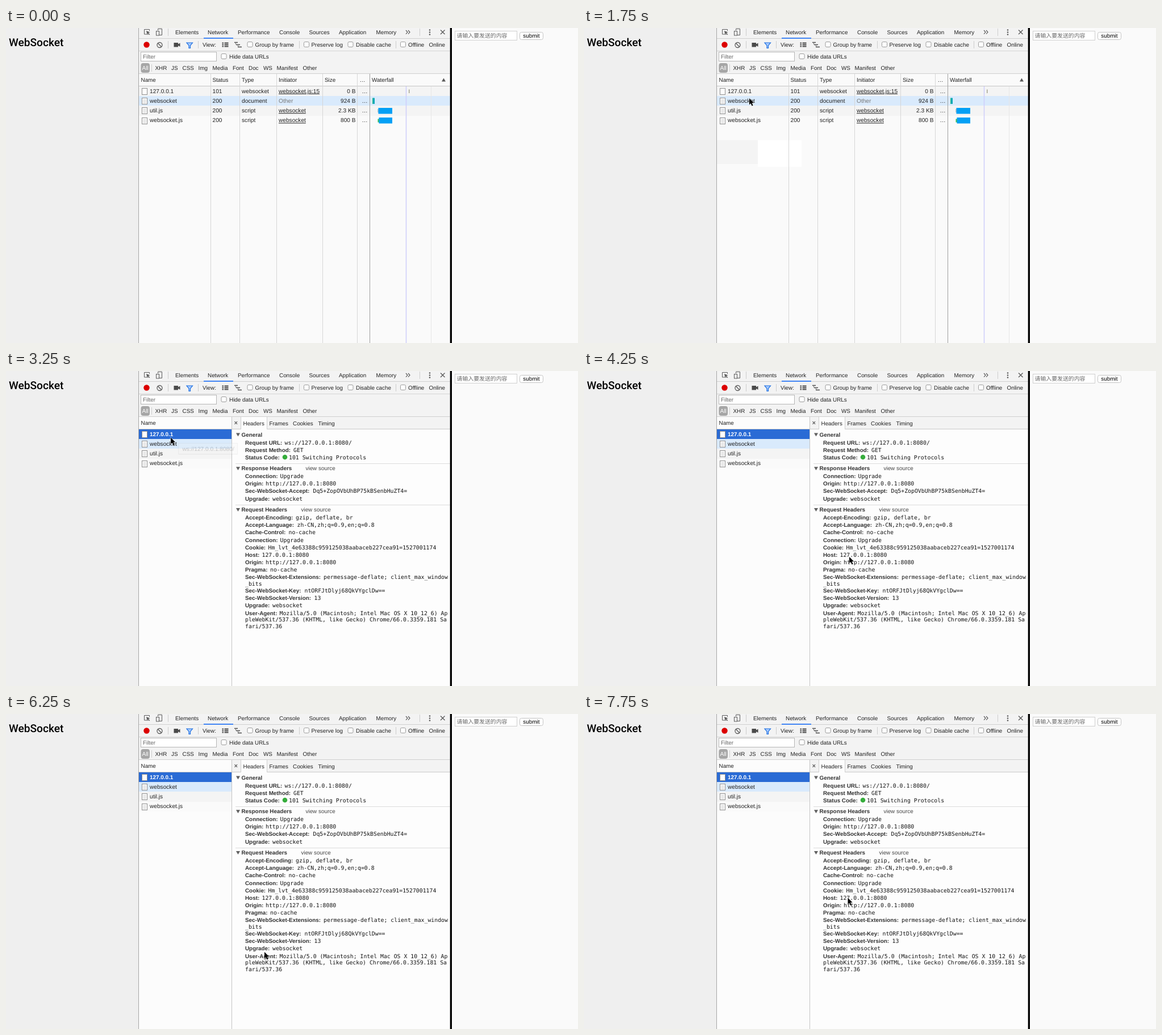
These frames come from a looping animation (1007 by 556 pixels, 8 s). An HTML page:

```html
<!DOCTYPE html>
<html lang="en">
<head>
<meta charset="utf-8">
<title>WebSocket network panel</title>
<style>
html, body { margin: 0; width: 100%; height: 100%; overflow: hidden; background: #fafafa; }
svg { position: absolute; left: 0; top: 0; display: block; }
text { font: 10px "Liberation Sans", Arial, sans-serif; fill: #222; white-space: pre; text-rendering: geometricPrecision; }
.bar { font-size: 9.9px; }
.cell { font-size: 10.15px; }
.bold { font-size: 9.87px; font-weight: bold; fill: #333; }
.mono { font: 9.83px "DejaVu Sans Mono", monospace; fill: #141414; }
.cjk { font: 9.9px "Noto Sans CJK SC", "Noto Sans CJK", sans-serif; fill: #686868; }
.title { font: 500 19.1px Roboto, "Liberation Sans", sans-serif; fill: #000; }
.link { text-decoration: underline; }
.end { text-anchor: end; }
</style>
</head>
<body>
<svg id="stage" width="1007" height="556" viewBox="0 0 1007 556"></svg>
<script>
const LOOP = 8000;
const ROW_TOP = 103, ROW_H = 17.2;

const esc = s => s.replace(/&/g, '&amp;').replace(/</g, '&lt;');
const text = (x, y, s, cls = 'bar', extra = '') => `<text x="${x}" y="${y}" class="${cls}" ${extra}>${esc(s)}</text>`;
const rect = (x, y, w, h, fill, extra = '') => `<rect x="${x}" y="${y}" width="${w}" height="${h}" fill="${fill}" ${extra}/>`;
const path = (d, stroke, extra = '') => `<path d="${d}" fill="none" stroke="${stroke}" ${extra}/>`;
const vline = (x, y1, y2, color) => path(`M${x} ${y1}V${y2}`, color);
const hline = (y, x1, x2, color) => path(`M${x1} ${y}H${x2}`, color);
const group = (id, body) => `<g id="${id}">${body}</g>`;
const rowY = i => Math.round(ROW_TOP + i * ROW_H);
const baseY = i => 114.8 + i * ROW_H;
const checkbox = (x, y) => rect(x, y, 9, 9, '#fff', 'rx="2" stroke="#9b9b9b"');
const labels = (list, y) => list.map(([x, s]) => text(x, y, s)).join('');

function fileIcon(i, lined) {
  const y = rowY(i) + 3;
  return rect(239.5, y + .5, 9, 11, '#fff', 'stroke="#8f8f8f"') +
    (lined ? path(`M241.5 ${y + 3.5}h5m-5 2h5m-5 2h5m-5 2h5`, '#d3d3d3') : '');
}

function page() {
  return rect(0, 0, 234, 556, '#efefef') + text(5, 32, 'WebSocket', 'title') +
    rect(785, 0, 222, 556, '#fafafa') +
    rect(790.5, 5.5, 109, 16, '#fff', 'stroke="#d0d0d0"') +
    text(793.5, 17.3, '请输入要发送的内容', 'cjk') +
    rect(904.5, 7.5, 41, 13, '#fff', 'rx="3" stroke="#c4c4c4"') +
    text(910.3, 17.3, 'submit', 'bar', 'style="fill:#000"');
}

function toolbars() {
  const tabs = [[298, 'Elements'], [355, 'Network'], [408, 'Performance'], [481, 'Console'],
    [533.5, 'Sources'], [586, 'Application'], [651.5, 'Memory']];
  const types = [[262.5, 'XHR'], [291, 'JS'], [310.5, 'CSS'], [338.5, 'Img'], [363.5, 'Media'], [399, 'Font'],
    [427, 'Doc'], [453, 'WS'], [476.5, 'Manifest'], [522.5, 'Other']];
  const ink = '#5a5a5a';
  return rect(234, 0, 548, 81, '#f3f3f3') +
    hline(18.5, 234, 782, '#cfcfcf') + hline(40.5, 234, 782, '#d4d4d4') +
    // element picker and device icons
    path('M251 11H243.5V2.5H252.5V5', ink) +
    `<path d="M247 5l6.5 2.5-2.6 1 2.4 3-1 .8-2.4-3-1.4 2z" fill="${ink}"/>` +
    path('M267.5 4V1.5H274.5V12.5H270', ink) + rect(264.5, 5.5, 5, 7.5, '#f3f3f3', `stroke="${ink}"`) +
    vline(285.5, 1, 14, '#cdcdcd') + labels(tabs, 11) +
    rect(348, 17, 52, 2, '#4285f4') +
    path('M704 4l3 3.3-3 3.3M708 4l3 3.3-3 3.3', ink, 'stroke-width="1.2"') +
    vline(728.5, 1, 14, '#cdcdcd') +
    [3.5, 7.5, 11.5].map(y => `<circle cx="746" cy="${y}" r="1.3" fill="${ink}"/>`).join('') +
    path('M765 3.5l7.5 7.5m0-7.5l-7.5 7.5', ink, 'stroke-width="1.4"') +
    // record, clear, camera, filter, view modes
    '<circle cx="247.5" cy="29.5" r="5.2" fill="#dc0000"/>' +
    `<circle cx="270.5" cy="30" r="4.5" fill="none" stroke="${ink}" stroke-width="1.3"/>` +
    path('M267.3 26.8l6.4 6.4', ink, 'stroke-width="1.3"') +
    vline(285.5, 23, 36, '#cdcdcd') +
    '<path d="M295.5 26h7.5v2.5l3.5-2v6.5l-3.5-2v2.5h-7.5z" fill="#4a4a4a"/>' +
    '<path d="M318 26h10.5l-4 5v4.5h-2.5v-4.5z" fill="#a9ccff" stroke="#1a6ce0" stroke-width="1.2"/>' +
    vline(338.5, 23, 36, '#cdcdcd') + text(346, 33, 'View:') +
    path('M380.5 26.5h2.5m1.5 0h7m-11 3h2.5m1.5 0h7m-11 3h2.5m1.5 0h7', '#4a4a4a', 'stroke-width="1.8"') +
    path('M402 25.5h6m-3 4h7m-4 4h7', '#4a4a4a', 'stroke-width="1.5"') + path('M404.5 25v4m4 0v4', '#777') +
    [[425, 24.5], [524.5, 24.5], [602, 24.5], [694.5, 24.5], [379, 45.5]].map(p => checkbox(...p)).join('') +
    labels([[438.5, 'Group by frame'], [537.5, 'Preserve log'], [616, 'Disable cache'], [708, 'Offline'], [744.5, 'Online']], 33) +
    vline(516.5, 23, 36, '#cdcdcd') + vline(686.5, 23, 36, '#cdcdcd') +
    rect(237.5, 42.5, 133, 16, '#fff', 'stroke="#b5b5b5"') +
    text(241, 54, 'Filter', 'bar', 'style="fill:#666"') + text(393, 54, 'Hide data URLs') +
    rect(237.5, 62, 15.5, 17, '#a6a6a6', 'rx="4"') + text(239.5, 74, 'All', 'cell', 'style="fill:#fff"') +
    vline(256.5, 64, 77, '#cdcdcd') + labels(types, 74);
}

const FILES = [
  ['127.0.0.1', '101', 'websocket', 'websocket.js:15', '0 B'],
  ['websocket', '200', 'document', 'Other', '924 B'],
  ['util.js', '200', 'script', 'websocket', '2.3 KB'],
  ['websocket.js', '200', 'script', 'websocket', '800 B']
];
const SHADES = ['#f4f4f4', '#d9eafc', '#f4f4f4', '#fafafa'];

const band = (i, width, fill, extra) => rect(234, rowY(i), width, rowY(i + 1) - rowY(i), fill, extra);
const rowBands = width => SHADES.map((c, i) => band(i, width, c)).join('');

function tableView() {
  const heads = [[237.5, 'Name'], [363.5, 'Status'], [415, 'Type'], [480, 'Initiator'], [561, 'Size'], [622.5, '…'], [644, 'Waterfall']];
  const rows = FILES.map(([name, status, type, from, size], i) => {
    const y = baseY(i), other = from === 'Other';
    return fileIcon(i, i > 0) + text(253, y, name, 'cell') + text(363.5, y, status, 'cell') +
      text(415, y, type, 'cell') + text(480, y, from, other ? 'cell' : 'cell link', other ? 'style="fill:#777"' : '') +
      text(615.5, y, size, 'cell end') + text(626.5, y, '…', 'cell');
  }).join('');
  return rect(234, 81, 548, 475, '#fafafa') + rowBands(548) +
    group('residue', rect(234, 172, 146, 68, '#f4f4f4') + rect(306, 180, 77, 65, '#fff')) +
    group('cleared', rect(234, 172, 548, 26, '#fafafa')) +
    band(0, 548, '#eaf2fb', 'id="hover"') +
    hline(80.5, 234, 782, '#cfcfcf') + rect(234, 81, 548, 21, '#fafafa') + hline(102.5, 234, 782, '#c6c6c6') +
    [360.5, 411.5, 476.5, 557.5, 618.5].map(x => vline(x, 81, 556, '#d6d6d6')).join('') +
    vline(748.5, 103, 556, '#e6e6e6') + vline(640.5, 81, 556, '#a0a0a0') +
    rect(703.7, 103, 1.6, 453, '#cfcffb') +
    labels(heads, 95) + '<path d="M767 94.5l3.5-6 3.5 6z" fill="#5a5a5a"/>' + rows +
    rect(709, 108.5, 1.5, 6.5, '#a5a58f') +
    rect(645, 123.5, 1.5, 10.5, '#35c08a') + rect(646, 123.5, 3, 10.5, '#00a8b8') +
    rect(654, 143, 2, 6, '#c8c8c8') + rect(655.5, 141, 24.5, 10.5, '#03a0f5') +
    rect(654.5, 160.5, 3, 6, '#3cc05c') + rect(656.5, 158, 23.5, 10.5, '#03a0f5');
}

// label, value x, value (an extra string is a wrapped line)
const SECTIONS = [
  { y: 115.5, title: 'General', first: 129.6, lines: [
    ['Request URL:', 490.5, 'ws://127.0.0.1:8080/'],
    ['Request Method:', 506, 'GET'],
    ['Status Code:', 498, '101 Switching Protocols']] },
  { y: 175.3, title: 'Response Headers', source: 527.5, first: 189.2, lines: [
    ['Connection:', 482.5, 'Upgrade'],
    ['Origin:', 457, 'http://127.0.0.1:8080'],
    ['Sec-WebSocket-Accept:', 540.5, 'Dq5+ZopOVbUhBP75kBSenbHuZT4='],
    ['Upgrade:', 469, 'websocket']] },
  { y: 248, title: 'Request Headers', source: 519.5, first: 262.2, lines: [
    ['Accept-Encoding:', 510, 'gzip, deflate, br'],
    ['Accept-Language:', 512.5, 'zh-CN,zh;q=0.9,en;q=0.8'],
    ['Cache-Control:', 497.5, 'no-cache'],
    ['Connection:', 482.5, 'Upgrade'],
    ['Cookie:', 461.5, 'Hm_lvt_4e63388c959125038aabaceb227cea91=1527001174'],
    ['Host:', 450.5, '127.0.0.1:8080'],
    ['Origin:', 457, 'http://127.0.0.1:8080'],
    ['Pragma:', 465, 'no-cache'],
    ['Sec-WebSocket-Extensions:', 559, 'permessage-deflate; client_max_window', '_bits'],
    ['Sec-WebSocket-Key:', 525.5, 'ntORFJtDlyj68QkVYgclDw=='],
    ['Sec-WebSocket-Version:', 542.5, '13'],
    ['Upgrade:', 469, 'websocket'],
    ['User-Agent:', 481.5, 'Mozilla/5.0 (Macintosh; Intel Mac OS X 10_12_6) Ap',
      'pleWebKit/537.36 (KHTML, like Gecko) Chrome/66.0.3359.181 Sa', 'fari/537.36']] }
];

function section({ y, title, source, first, lines }) {
  let out = `<path d="M405 ${y - 6}h7l-3.5 6z" fill="#5f5f5f"/>` + text(414.5, y, title, 'bold');
  if (source) out += text(source, y, 'view source', 'bar', 'style="fill:#444"') + hline(Math.round(y - 12) + .5, 404, 782, '#dcdcdc');
  let at = first;
  for (const [label, x, value, ...wraps] of lines) {
    out += text(421, at, label, 'bold') + text(x, at, value, 'mono');
    for (const w of wraps) out += text(421, at += 11.9, w, 'mono');
    at += wraps.length ? 12.3 : 13.1;
  }
  return out;
}

function detailView() {
  const names = FILES.map(([name], i) => fileIcon(i, i > 0) +
    (i ? text(253, baseY(i), name, 'cell') : text(253, baseY(i), name, 'bold', 'style="fill:#fff"'))).join('');
  return rect(234, 81, 164, 475, '#fcfcfc') + rect(398, 81, 384, 475, '#fdfdfd') + rowBands(164) +
    band(0, 164, '#2a6bd5') + names +
    rect(398, 81, 384, 21, '#f3f3f3') + rect(413, 81, 46, 22, '#fdfdfd') +
    hline(80.5, 234, 782, '#cfcfcf') + hline(102.5, 234, 413, '#cacaca') + hline(102.5, 459, 782, '#cacaca') +
    vline(413.5, 81, 103, '#cfcfcf') + vline(459.5, 81, 103, '#cfcfcf') + vline(397.5, 81, 556, '#c4c4c4') +
    path('M402.5 89.2l4.6 4.6m0-4.6l-4.6 4.6', '#555', 'stroke-width="1.2"') +
    text(237.5, 95, 'Name') + labels([[417.5, 'Headers'], [463.5, 'Frames'], [505, 'Cookies'], [549.5, 'Timing']], 96) +
    SECTIONS.map(section).join('') +
    '<circle cx="491" cy="152" r="4.3" fill="#36ad3c"/>';
}

const tooltip = rect(304, 128, 104, 20, '#000', 'opacity=".12" rx="1"') +
  rect(303.5, 127.5, 104, 19, '#f3f3f3', 'stroke="#c8c8c8"') +
  text(310.5, 141, 'ws://127.0.0.1:8080/', 'cell');

const cursor = '<path d="M0 0V11.4L2.6 9 4.6 13.6 6.6 12.7 4.6 8.3H8.2Z" fill="#000" stroke="#fff" stroke-width=".9" paint-order="stroke"/>';

document.getElementById('stage').innerHTML = page() + toolbars() +
  group('table', tableView()) + group('detail', detailView()) +
  vline(233.5, 0, 556, '#a6a6a6') + rect(781.7, 0, 3.3, 556, '#000') +
  group('tip', tooltip) + group('cursor', cursor);

// time, x, y of the pointer
const POINTER = [
  [250, 3, 132], [500, 240, 195], [750, 372, 229], [1250, 309, 182.5], [1500, 296, 142], [1750, 291, 124], [2000, 290, 117.5],
  [3500, 310, 143], [3750, 365, 210], [4000, 430, 285], [4250, 467, 328], [4500, 458, 355], [4750, 447, 385],
  [5000, 439, 412], [5250, 435.5, 431.5], [5500, 440, 424], [5750, 425, 421], [6000, 440, 420], [6250, 455, 420],
  [6500, 470, 420], [6750, 481, 419], [7000, 496, 420], [7250, 509.5, 419.5], [7500, 488, 371], [7750, 464.5, 324.5]
];

const el = {};
for (const id of ['table', 'detail', 'residue', 'cleared', 'hover', 'tip', 'cursor']) el[id] = document.getElementById(id);
const toggle = (id, on) => { el[id].style.display = on ? '' : 'none'; };

function draw(t) {
  const spot = POINTER.filter(p => p[0] <= t).pop();
  toggle('table', t < 3250);
  toggle('detail', t >= 3250);
  toggle('residue', t >= 1250);
  toggle('cleared', t >= 1500);
  toggle('cursor', spot);
  if (spot) el.cursor.setAttribute('transform', `translate(${spot[1]} ${spot[2]})`);

  const row = spot ? Math.floor((spot[2] - ROW_TOP) / ROW_H) : -1;
  const hovering = t >= 1500 && row >= 0 && row < 4 && row !== 1;
  toggle('hover', hovering);
  if (hovering) el.hover.setAttribute('y', rowY(row));

  toggle('tip', t >= 2250 && t < 3500);
  el.tip.setAttribute('opacity', t < 3250 ? 1 : .22);
}

const start = performance.now();
function tick() {
  draw((performance.now() - start) % LOOP);
  requestAnimationFrame(tick);
}
tick();
</script>
</body>
</html>
```
